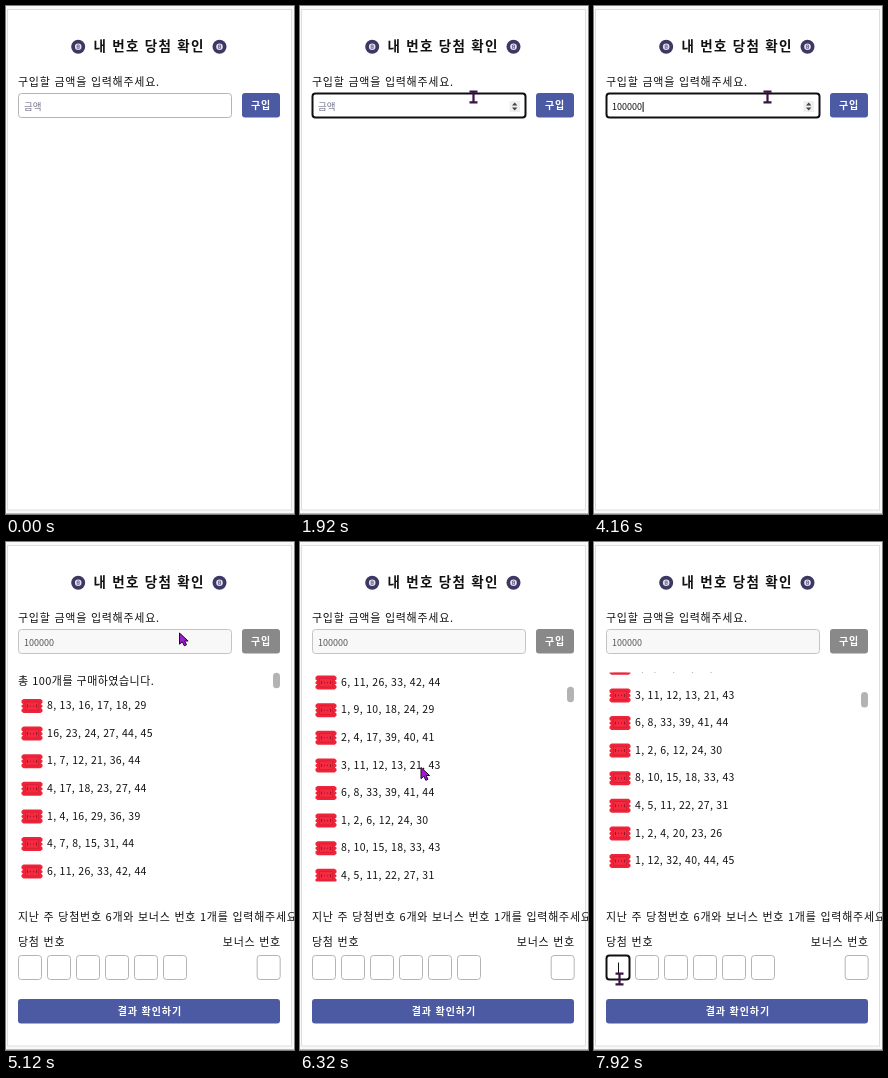
Animation, 288 px wide and 508 px high, one loop 8 s. Source, as an HTML page:

```html
<!DOCTYPE html>
<html lang="ko">
<head>
<meta charset="utf-8">
<title>내 번호 당첨 확인</title>
<style>
  html, body { margin: 0; width: 100%; height: 100%; overflow: hidden; background: #f9f9f9; }
  svg { display: block; width: 100vw; height: 100vh; }
  text { font-family: "Noto Sans CJK KR", "Noto Sans CJK JP", "Noto Sans CJK", sans-serif; fill: #111; white-space: pre; }
  .title { font-size: 13.5px; font-weight: 700; letter-spacing: 1.3px; }
  .label { font-size: 11px; letter-spacing: .75px; }
  .count { letter-spacing: .47px; }
  .row { font-size: 10.5px; letter-spacing: .3px; }
  .field { font-size: 9px; }
  .btn { font-size: 10px; font-weight: 700; letter-spacing: .9px; fill: #fff; }
  .box { fill: #fff; stroke: #b4b4b4; }
  .box.focus { stroke: #101014; stroke-width: 2; }
  .box.off { fill: #f8f8f8; stroke: #c4c4c4; }
</style>
</head>
<body>
<svg viewBox="0 0 288 508" preserveAspectRatio="none">
  <defs>
    <clipPath id="view"><rect x="12" y="130.5" width="262" height="209"/></clipPath>
    <g id="ball">
      <circle r="7" fill="#3c3763"/>
      <circle r="3.3" fill="#e4e2f0"/>
      <path d="M-1-1.7h2v3.4h-2zM-1 0h2" fill="none" stroke="#5a5580" stroke-width=".7"/>
    </g>
    <g id="ticket">
      <path d="M-8.5-7H8.5L10.5-5.5V-3.2L8.9-1.8 10.5-.6V.8L8.9 2 10.5 3.4V5.5L8.5 7H-8.5L-10.5 5.5V3.4L-8.9 2-10.5 .8V-.6L-8.9-1.8-10.5-3.2V-5.5z" fill="#ee2439"/>
      <path d="M-6.5-4.3h13v8.6h-13z" fill="#f5293f" stroke="#d21d35" stroke-width=".7"/>
      <path d="M-4.5-1.5v3M4.5-1.5v3M-2 0h1M1 0h1" stroke="#9c1730" stroke-width="1.1"/>
    </g>
  </defs>

  <rect width="288" height="508" fill="#f9f9f9"/>
  <rect x="1.5" y="3.5" width="284" height="500.5" fill="#fff" stroke="#dedede"/>
  <path d="M0 507.5H288" stroke="#b9b9b9"/>

  <use href="#ball" x="72.2" y="40.7"/>
  <use href="#ball" x="213.5" y="40.7"/>
  <text class="title" x="87.5" y="45">내 번호 당첨 확인</text>
  <text class="label" x="12" y="80.2">구입할 금액을 입력해주세요.</text>

  <rect id="amount" class="box" x="12.5" y="87.5" width="213" height="24" rx="3"/>
  <text id="value" class="field" x="18" y="104"></text>
  <g id="spinner">
    <rect x="209.5" y="95" width="10.5" height="11" fill="#efefef"/>
    <path d="M212 99.6l2.7-3 2.7 3zM212 101.4l2.7 3 2.7-3z" fill="#444"/>
  </g>
  <rect id="buy" x="236" y="87" width="38" height="24.5" rx="3"/>
  <text class="btn" x="245" y="103.2">구입</text>

  <g id="result">
    <g clip-path="url(#view)"><g id="list">
      <text class="label count" x="12" y="143.2">총 100개를 구매하였습니다.</text>
    </g></g>
    <rect id="thumb" x="267" width="7" height="15.5" rx="3.5" fill="#b3b3b3"/>
    <text class="label" x="12" y="379.2">지난 주 당첨번호 6개와 보너스 번호 1개를 입력해주세요.</text>
    <text class="label" x="12" y="403.6">당첨 번호</text>
    <text class="label" x="216.8" y="403.6">보너스 번호</text>
    <g id="slots"></g>
    <rect x="12" y="457" width="262" height="24.6" rx="3" fill="#4b5aa3"/>
    <text class="btn" x="111.7" y="473.2">결과 확인하기</text>
  </g>

  <path id="caret" stroke="#111" fill="none"/>
  <path id="beam" d="M-4-5.3H4M0-5.3V5.3M-4 5.3H4" fill="none" stroke="#3a1244" stroke-width="2.2"/>
  <path id="arrow" d="M0 0V11.2L2.8 8.8 4.8 12.8 7 11.8 5.1 8H8.6z" fill="#a11ad2" stroke="#1a0a24"/>
</svg>
<script>
const LOOP = 8000, STEP = 80, PITCH = 27.6;
const HOVER = 640, FOCUS = 1520, BOUGHT = 4320, SLOT_FOCUS = 7920;
const TYPED = [2640, 2880, 3120, 3360, 3520, 3920];
const TICKETS = [
  "8, 13, 16, 17, 18, 29", "16, 23, 24, 27, 44, 45", "1, 7, 12, 21, 36, 44",
  "4, 17, 18, 23, 27, 44", "1, 4, 16, 29, 36, 39", "4, 7, 8, 15, 31, 44",
  "6, 11, 26, 33, 42, 44", "1, 9, 10, 18, 24, 29", "2, 4, 17, 39, 40, 41",
  "3, 11, 12, 13, 21, 43", "6, 8, 33, 39, 41, 44", "1, 2, 6, 12, 24, 30",
  "8, 10, 15, 18, 33, 43", "4, 5, 11, 22, 27, 31", "1, 2, 4, 20, 23, 26",
  "1, 12, 32, 40, 44, 45"
];
// [time, x, y] and [time, offset]
const POINTER = [
  [640, 262, 100], [880, 214, 97], [1200, 173.5, 91], [5280, 173.5, 91], [5440, 158, 140],
  [5680, 121, 225.5], [6640, 121, 225.5], [6800, 108, 330], [6960, 75, 441],
  [7120, 54.5, 436], [7280, 54.5, 436], [7520, 27, 436.5], [7600, 25.5, 437]
];
const SCROLL = [[5680, 0], [5920, 55], [6160, 135], [6320, 189], [6480, 242], [6560, 259]];

const $ = id => document.getElementById(id);
const show = (id, on) => $(id).setAttribute("visibility", on ? "visible" : "hidden");
const set = (id, name, value) => $(id).setAttribute(name, value);

function add(parent, tag, attrs, text = "") {
  const el = document.createElementNS("http://www.w3.org/2000/svg", tag);
  for (const k in attrs) el.setAttribute(k, attrs[k]);
  el.textContent = text;
  return $(parent).appendChild(el);
}

function at(track, t) {
  const i = track.findIndex(k => k[0] > t);
  if (i === 0) return track[0].slice(1);
  if (i < 0) return track[track.length - 1].slice(1);
  const [a, b] = [track[i - 1], track[i]];
  const p = (t - a[0]) / (b[0] - a[0]);
  return a.slice(1).map((v, n) => v + (b[n + 1] - v) * p);
}

TICKETS.forEach((numbers, i) => {
  const y = 163.4 + i * PITCH;
  add("list", "use", { href: "#ticket", x: 26, y: y + .6 });
  add("list", "text", { class: "row", x: 41, y: y + 3.8 }, numbers);
});
const slots = [0, 1, 2, 3, 4, 5, 8.23].map(i =>
  add("slots", "rect", { class: "box", x: 12.5 + i * 29, y: 413.5, width: 23, height: 24, rx: 3 }));

function draw(t) {
  const bought = t >= BOUGHT, focused = t >= FOCUS && !bought;
  const count = TYPED.filter(k => t >= k).length;

  set("amount", "class", "box" + (bought ? " off" : focused ? " focus" : ""));
  $("value").textContent = count ? "100000".slice(0, count) : "금액";
  $("value").style.fill = bought ? "#555" : count ? "#111" : "#77778c";
  $("value").style.fontSize = count ? "9px" : "9.5px";
  show("spinner", t >= HOVER && !bought);
  set("buy", "fill", bought ? "#898989" : "#4b5aa3");

  show("result", bought);
  const [offset] = at(SCROLL, t);
  set("list", "transform", `translate(0 ${-offset})`);
  set("thumb", "y", 130.7 + offset * .0745);

  const slotFocus = t >= SLOT_FOCUS;
  slots[0].setAttribute("class", slotFocus ? "box focus" : "box");
  set("caret", "d", slotFocus ? "M24.5 420.5V432.5" : `M${18.5 + count * 5 + (count ? .6 : 0)} 96V106`);
  show("caret", slotFocus || (focused && t >= 2480));

  const [x, y] = at(POINTER, t);
  const onText = !bought ? x < 226 : t >= 7120;
  for (const id of ["beam", "arrow"]) set(id, "transform", `translate(${x} ${y})`);
  show("beam", t >= HOVER && onText);
  show("arrow", t >= HOVER && !onText);
}

function tick() {
  const t = performance.now() % LOOP;
  draw(Math.floor(t / STEP) * STEP);
  requestAnimationFrame(tick);
}
tick();
</script>
</body>
</html>
```
